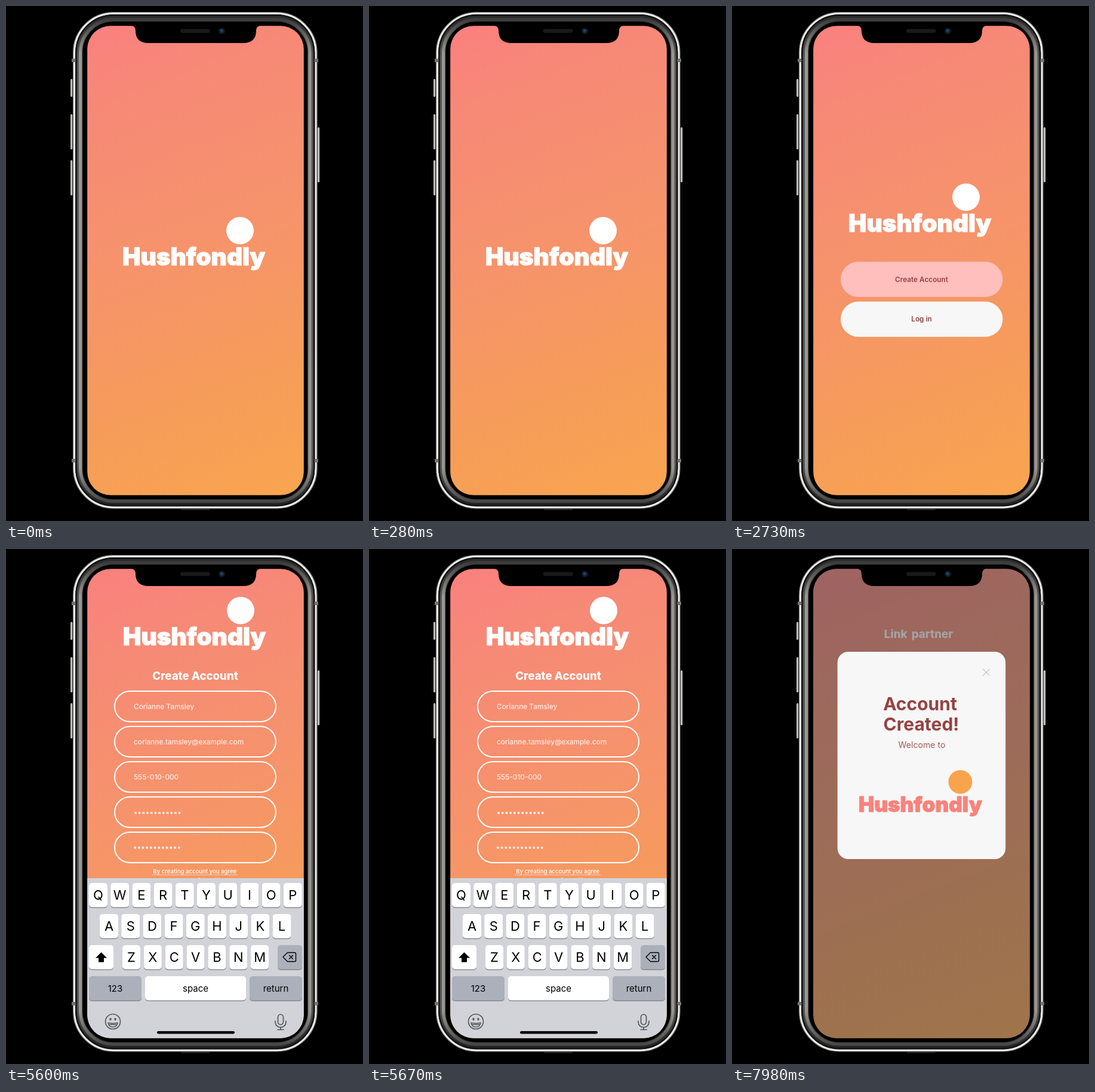
These frames come from a looping animation (598 by 862 pixels, 8 s). An HTML page:

```html
<!DOCTYPE html>
<html lang="en">
<head>
<meta charset="utf-8">
<title>Sign-up flow</title>
<style>
  html, body { margin: 0; width: 100%; height: 100%; overflow: hidden; background: #000; }
  svg { display: block; width: 598px; height: 862px; font-family: Inter, "Open Sans", sans-serif; }
</style>
</head>
<body>
<svg id="stage" viewBox="0 0 598 862"></svg>
<script>
const LOOP = 8000;
const RED = '#964242', CORAL = '#f9837c', ORANGE = '#f9a34c', PAPER = '#f7f7f7';

const rect = (x, y, w, h, r, fill, extra = '') =>
  `<rect x="${x}" y="${y}" width="${w}" height="${h}" rx="${r}" fill="${fill}" ${extra}/>`;

const text = (str, x, y, size, weight, fill, anchor = 'middle', extra = '') =>
  `<text x="${x}" y="${y}" font-size="${size}" font-weight="${weight}" fill="${fill}" text-anchor="${anchor}" ${extra}>${str}</text>`;

const line = (d, color, width) =>
  `<path d="${d}" fill="none" stroke="${color}" stroke-width="${width}" stroke-linecap="round" stroke-linejoin="round"/>`;

const circle = (x, y, r, fill) => `<circle cx="${x}" cy="${y}" r="${r}" fill="${fill}"/>`;

// Wordmark whose baseline starts at (x, y), with a round emblem above it
const logo = (x, y, scale = 1, ink = '#fff', emblem = ink) =>
  `<g transform="translate(${x} ${y}) scale(${scale})">
    ${circle(197, -58, 23, emblem)}
    ${text('Hushfondly', 0, 0, 40.5, 900, ink, 'start', `stroke="${ink}" stroke-width="1.2" stroke-linejoin="round"`)}
  </g>`;

const pill = (label, x, y, fill, textX = x + 135.5, anchor) =>
  rect(x, y, 271.5, 59, 29.5, fill) + text(label, textX, y + 33.6, 11.8, 600, RED, anchor);

const fieldText = (str, row, x = 214) =>
  text(str, x, 268.2 + row * 59, 11.8, 500, '#fff', 'start', 'opacity=".82"');

const dots = (x, y) =>
  `<path d="M${x} ${y}h76" stroke="#fff" stroke-width="4" stroke-linecap="round" stroke-dasharray="0 6.7" opacity=".85"/>`;

function form(shift, contents) {
  let out = logo(195 + shift, 161) + text('Create Account', 317, 218.6, 18.6, 800, '#fff');
  for (let row = 0; row < 5; row++)
    out += rect(182, 238 + row * 59, 270, 51, 25.5, 'none', 'stroke="#fff" stroke-width="2"');
  ['By creating account you agree', 'to our terms of conditions'].forEach((str, i) => {
    const half = i ? 60.5 : 71.5, y = 543 + i * 14.5;
    out += text(str, 316.3, y, 9.6, 500, '#fff') + line(`M${316.3 - half} ${y + 2.5}h${half * 2}`, '#ffffffb0', 0.8);
  });
  return out + contents;
}

function keyboard() {
  const key = (label, x, y, w, size = 22, fill = '#fff') =>
    rect(x, y + 1, w, 41, 5, '#898b90') + rect(x, y, w, 40.5, 5, fill) +
    text(label, x + w / 2, y + 20.5 + size * 0.36, size, 400, '#000');
  const row = (letters, x, y, pitch, w) =>
    [...letters].map((c, i) => key(c, x + i * pitch, y, w)).join('');
  const gray = '#abb0bb', ink = '#53565c';
  const eye = x => `<ellipse cx="${x}" cy="787" rx="1.6" ry="2.2" fill="${ink}"/>`;
  return rect(136, 551, 364, 270, 0, '#d1d3d9') +
    row('QWERTYUIOP', 139, 559, 36.2, 31) +
    row('ASDFGHJKL', 157, 611, 36.2, 31) +
    key('', 139, 663, 41) + row('ZXCVBNM', 195, 663, 35.85, 30) + key('', 455, 663, 41, 22, gray) +
    key('123', 139, 715, 88, 15, gray) + key('space', 233, 715, 169, 15) + key('return', 408, 715, 88, 15, gray) +
    '<path d="M159.5 675l9.5 9.5h-5v7h-9v-7h-5z"/>' +
    line('M464 683l7.5-7.5h12q2 0 2 2v11q0 2-2 2h-12zM474.5 680l6 6m0-6l-6 6', '#000', 1.4) +
    line('M166.5 791a12.5 12.5 0 1 0 25 0a12.5 12.5 0 1 0-25 0M171 793q8 2 16 0q-1 7-8 7t-8-7M172 796h14', ink, 1.6) +
    eye(175) + eye(183) +
    rect(455.5, 779, 9, 17, 4.5, 'none', `stroke="${ink}" stroke-width="1.7"`) +
    line('M451 790v2a9 8.5 0 0 0 18 0v-2M460 800.5v4M455 804.5h10', ink, 1.7) +
    rect(253, 807, 130, 4.5, 2.25, '#000');
}

const placeholders = ['Name', 'Email', 'Phone Number', 'Password']
  .map((str, i) => fieldText(str, i)).join('') + fieldText('Confirm Password', 4, 215.5);

const filled = ['Corianne Tamsley', 'corianne.tamsley@example.com', '555-010-000']
  .map((str, i) => fieldText(str, i)).join('') + dots(217, 441.7) + dots(216, 500);

const screens = [
  { start: 0, art: logo(195, 434) },
  { start: 2730, art: logo(195, 378) +
      pill('Create Account', 182, 428, '#ffbfbd') + pill('Log in', 182, 494.7, PAPER) },
  { start: 4200, art: form(0, placeholders +
      rect(268.3, 621.6, 12.8, 10, 5, 'none', 'stroke="#fff" stroke-width="3"') +
      text('remember me', 290.5, 629, 11.7, 500, '#fff', 'start') +
      pill('Continue with Chatfern', 181, 645.7, PAPER, 262, 'start') + circle(241, 676.5, 11.3, '#1683f0') +
      pill('Continue with Woopel', 181, 712.3, PAPER, 269.5, 'start') + circle(251, 742.7, 10.5, '#4285f4')) },
  { start: 5600, art: form(1, filled + keyboard()) },
  { start: 7910, art:
      text('Link partner', 312.5, 149, 18.7, 800, '#fff', 'middle', 'word-spacing="3"') +
      rect(136, 33, 364, 787, 0, '#464646', 'opacity=".5"') +
      rect(176.7, 172, 281.5, 347, 18, PAPER) +
      line('M420.5 201l11 11m0-11l-11 11', '#a6a6a6', 1) +
      text('Account', 315, 269.5, 30, 700, RED) + text('Created!', 317, 304.2, 30, 700, RED) +
      text('Welcome to', 318, 333, 14.1, 400, '#a25c5a') +
      logo(212, 440, 0.865, CORAL, ORANGE) },
];

// Rounded ring inset from the outer edge of the phone
const ring = (inset, width, color) =>
  rect(112 + inset, 10 + inset, 409.5 - 2 * inset, 831.5 - 2 * inset, 68 - inset, 'none',
    `stroke="${color}" stroke-width="${width}"`);

const body =
  [[122, 30], [181, 59], [258, 59]].map(([y, h]) => rect(108, y, 3.2, h, 1.5, '#bdbdba')).join('') +
  rect(522, 203, 3.2, 92, 1.5, '#bdbdba') +
  rect(293, 842, 48, 1.8, 1, '#262626') +
  ring(1, 2, '#8d8d8b') + ring(2.7, 2.8, '#f1f1ef') + ring(5.5, 2.6, '#161616') +
  ring(11.5, 9.5, 'url(#shade)') + ring(12.5, 5, 'url(#metal)') +
  [91, 761].map(y => rect(110, y - 3, 6.5, 6, 1, '#747472') + rect(516.5, y - 3, 6.5, 6, 1, '#747472')).join('');

const notch =
  '<path d="M209 32.5q8 1 8 9q0 20.5 22 20.5h158q22 0 22-20.5q0-8 8-9z"/>' +
  rect(292, 38.5, 49.5, 6.5, 3, '#191919') +
  circle(361.5, 41.7, 5.5, '#111820') + circle(361.5, 41.7, 3, '#1b3555') + circle(360.5, 40.8, 1, '#3f6795');

const stops = list => list.map(([at, color]) => `<stop offset="${at}" stop-color="${color}"/>`).join('');

document.getElementById('stage').innerHTML = `
  <defs>
    <linearGradient id="sky" gradientUnits="userSpaceOnUse" x1="162" y1="25" x2="473" y2="827">
      ${stops([[0, '#fa807f'], [0.18, '#f68a76'], [0.5, '#f6946a'], [0.75, '#f69c5a'], [1, '#f9a550']])}
    </linearGradient>
    <linearGradient id="shade" x2="0" y2="1">
      ${stops([[0, '#2c2c2c'], [0.08, '#565654'], [0.92, '#565654'], [1, '#262626']])}
    </linearGradient>
    <linearGradient id="metal" x2="0" y2="1">
      ${stops([[0, '#3c3c3c'], [0.07, '#9a9792'], [0.93, '#9a9792'], [1, '#484848']])}
    </linearGradient>
    <clipPath id="glass">${rect(136.2, 33.2, 362.6, 785.6, 39, '#000')}</clipPath>
  </defs>
  ${body}
  <g clip-path="url(#glass)">
    ${rect(136, 33, 363, 786, 0, 'url(#sky)')}
    ${screens.map(s => `<g class="screen">${s.art}</g>`).join('')}
  </g>
  ${notch}`;

const groups = document.querySelectorAll('.screen');

function draw() {
  const t = performance.now() % LOOP;
  const current = screens.findLastIndex(s => s.start <= t);
  groups.forEach((g, i) => g.style.display = i === current ? '' : 'none');
  requestAnimationFrame(draw);
}
draw();
</script>
</body>
</html>
```
